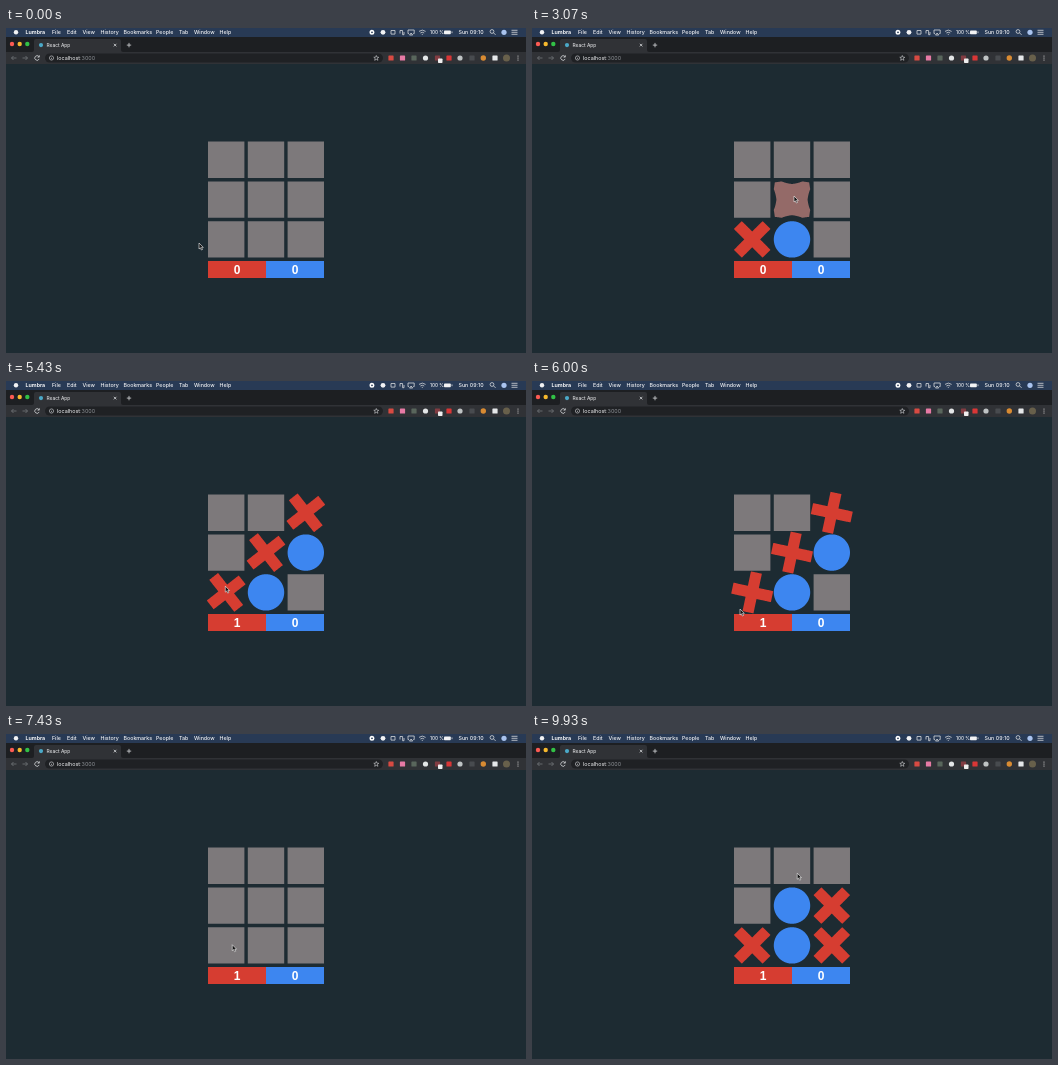
Animation, 520 px wide and 325 px high, one loop 10 s. Source, as an HTML page:

```html
<!DOCTYPE html>
<html lang="en">
<head>
<meta charset="utf-8">
<title>Tic-tac-toe</title>
<style>
  html, body { margin: 0; width: 100%; height: 100%; overflow: hidden; background: #1d2b32; }
  svg { display: block; width: 520px; height: 325px; }
  text { font-family: Inter, Roboto, sans-serif; fill: #f1f2f4; }
  .menu { font-size: 5.3px; font-weight: 500; }
  .score { font: bold 12px "Liberation Sans", Arial, sans-serif; text-anchor: middle; fill: #fff; }
  .line { fill: none; stroke: #d5d7da; stroke-width: .8; }
</style>
</head>
<body>
<svg viewBox="0 0 520 325">
  <rect width="520" height="9" fill="#283a55"/>
  <rect y="9" width="520" height="15" fill="#1d1f22"/>
  <path d="M26 24q2 0 2-2v-9q0-2 2-2h83q2 0 2 2v9q0 2 2 2h403v12H0V24z" fill="#303236"/>
  <rect x="39" y="25.5" width="338" height="9" rx="4.5" fill="#1f2124"/>

  <g id="dots"></g>
  <g id="menu" class="menu"></g>

  <!-- menu bar status -->
  <circle cx="366" cy="4.3" r="1.7" fill="none" stroke="#fff" stroke-width="1.6"/>
  <path class="line" d="M385 2.5h4v3.6h-4zM394 5.5v-3h2.6v4.2h1.4V4M403 5.6h-1V2h6.200v3.600h-1M403.500 7l1.600-2 1.600 2z"/>
  <path class="line" d="M413 3.400q3.300-2.600 6.600 0M414.400 5q1.900-1.500 3.800 0M415.800 6.400h1"/>
  <rect x="438" y="2.400" width="6.800" height="3.800" rx=".8" fill="#f1f2f4"/>
  <path class="line" d="M446 3.400v1.800"/>
  <path class="line" d="M487.600 4.900l2 2M505.500 2.300h6M505.500 4.300h6M505.500 6.300h6"/>
  <circle class="line" cx="486" cy="3.500" r="1.900"/>

  <!-- tab and toolbar -->
  <text x="40.500" y="18.900" font-size="4.900">React App</text>
  <path class="line" d="M107.800 15.800l2.600 2.600m0-2.600l-2.600 2.600M120.800 17.100h4.400m-2.200-2.200v4.400"/>
  <path class="line" stroke="#777" style="stroke:#73767a" d="M10.500 30h-5m2-2l-2 2 2 2M16.500 30h5m-2-2l2 2-2 2"/>
  <path class="line" d="M33 28.700a2.300 2.300 0 1 0 .2 2.200M33.300 27.300v1.800h-1.800"/>
  <circle class="line" cx="45.500" cy="30" r="2.100" style="stroke-width:.6"/>
  <path class="line" d="M45.500 29.700v1.300" style="stroke-width:.6"/>
  <text x="51" y="31.900" font-size="5.400">localhost<tspan fill="#8d9196">:3000</tspan></text>
  <path class="line" style="stroke-width:.6" d="M370.300 27.500l.7 1.700 1.800.1-1.400 1.200.5 1.800-1.600-1-1.600 1 .5-1.800-1.400-1.200 1.800-.1z"/>
  <rect x="432" y="30.500" width="4.500" height="4.500" rx=".7" fill="#eee"/>

  <g id="cells"></g>
  <rect x="202" y="233" width="58" height="17" fill="#d63d31"/>
  <rect x="260" y="233" width="58" height="17" fill="#3d86f0"/>
  <text id="red" class="score" x="231" y="245.700">0</text>
  <text class="score" x="289" y="245.700">0</text>
  <path id="cursor" d="M0 0v6l1.400-1.200 1 2.200 1.100-.5-1-2.100h1.800z" fill="#111" stroke="#f4f4f4" stroke-width=".6"/>
</svg>
<script>
const $ = id => document.getElementById(id);
const add = (parent, tag, attrs, text = '') => {
  const el = document.createElementNS('http://www.w3.org/2000/svg', tag);
  for (const k in attrs) el.setAttribute(k, attrs[k]);
  el.textContent = text;
  return parent.appendChild(el);
};

// Browser furniture: plain dots and squares, then menu labels
for (const [cx, cy, r, fill] of [
  [10, 4.3, 2.2, '#f1f2f4'], [377, 4.3, 2.4, '#f1f2f4'], [498, 4.3, 2.6, '#a9c3ee'],
  [6, 16, 2.2, '#fc5b53'], [13.7, 16, 2.2, '#f6b92d'], [21.3, 16, 2.2, '#32c146'],
  [35, 17.1, 2.1, '#4ba9c8'], [419.5, 30, 2.6, '#e4e6e7'], [454, 30, 2.6, '#bfc3c4'],
  [477.3, 30, 2.7, '#d98b32'], [500.5, 30, 3.5, '#68604b'],
  [512, 28, .6, '#ddd'], [512, 30, .6, '#ddd'], [512, 32, .6, '#ddd']
]) add($('dots'), 'circle', { cx, cy, r, fill });
for (const [x, fill] of [[385, '#d84a42'], [396.500, '#e77aa5'], [408, '#59665c'],
  [431.500, '#823c42'], [443, '#d93636'], [466, '#484b4f'], [489, '#e5e7e9']])
  add($('dots'), 'rect', { x: x - 2.6, y: 27.4, width: 5.2, height: 5.2, rx: .7, fill });
for (const [x, label] of [[19.5, 'Lumbra'], [46, 'File'], [61, 'Edit'], [76.5, 'View'],
  [94.5, 'History'], [117.5, 'Bookmarks'], [150, 'People'], [173, 'Tab'], [188, 'Window'],
  [213.5, 'Help'], [424, '100 %'], [452.5, 'Sun 09:10']])
  add($('menu'), 'text', { x, y: 6.2, 'font-weight': x < 20 ? 700 : 500,
    'font-size': x === 424 ? 4.7 : 5.3 }, label);

// Each shape is a radius per direction plus a colour
const shapes = {
  square: { rgb: [125, 121, 123], r: (c, s) => 18.2 / Math.max(c, s) },
  circle: { rgb: [61, 134, 240], r: () => 18.2 },
  cross: { rgb: [214, 61, 49], r: (c, s) => {
    const u = (c + s) / Math.SQRT2, v = Math.abs(c - s) / Math.SQRT2;
    return Math.min(20.3 / u, 5.6 / v);
  } }
};
const mix = (a, b, p) => a + (b - a) * p;

function outline(from, to, p) {
  let d = '';
  for (let i = 0; i < 360; i++) {
    const a = i * Math.PI / 180, x = Math.cos(a), y = Math.sin(a);
    const c = Math.abs(x), s = Math.abs(y), r = mix(from.r(c, s), to.r(c, s), p);
    d += (i ? 'L' : 'M') + (x * r).toFixed(2) + ' ' + (y * r).toFixed(2);
  }
  return d + 'z';
}

// [cell, shape, start, duration]
const moves = [
  [6, 'cross', 357, 350], [7, 'circle', 2140, 350], [4, 'cross', 3000, 280],
  [5, 'circle', 3640, 280], [2, 'cross', 4429, 84],
  ...[2, 4, 5, 6, 7].map(cell => [cell, 'square', 6360, 200]),
  [6, 'cross', 7500, 220], [7, 'circle', 8000, 350], [8, 'cross', 8750, 250],
  [4, 'circle', 9200, 250], [5, 'cross', 9570, 210]
];

// Keys: [time, values...], linear between
const spin = [[4500, 0], [5430, 97], [6000, 147], [6360, 180]];
const pointer = [
  [0, 193, 215], [210, 213, 208], [800, 213, 208], [1070, 249, 192], [1300, 253, 227],
  [1600, 203, 223], [1860, 217, 208], [2070, 246, 210], [2570, 246, 214], [2930, 262, 168],
  [3360, 262, 168], [3640, 299, 172], [3930, 299, 172], [4210, 299, 139], [4500, 299, 139],
  [4750, 325, 160], [5070, 290, 238], [5430, 219, 205], [6000, 208, 228], [6360, 240, 256],
  [6570, 270, 243], [7000, 305, 124], [7430, 226, 211], [7700, 226, 211], [7930, 262, 212],
  [8500, 262, 212], [8750, 300, 212], [8970, 300, 212], [9200, 262, 172], [9400, 262, 172],
  [9570, 299, 172], [9710, 299, 172], [9930, 265, 139]
];
function track(keys, t) {
  const i = keys.findIndex(k => k[0] > t);
  if (i < 0) return keys.at(-1).slice(1);
  if (!i) return keys[0].slice(1);
  const a = keys[i - 1], b = keys[i], p = (t - a[0]) / (b[0] - a[0]);
  return a.slice(1).map((v, j) => mix(v, b[j + 1], p));
}

const cells = Array.from({ length: 9 }, () => add($('cells'), 'path', {}));

function draw(t) {
  cells.forEach((el, n) => {
    let from = shapes.square, to = from, p = 1;
    for (const [cell, kind, start, span] of moves)
      if (cell === n && t >= start) {
        from = to;
        to = shapes[kind];
        p = Math.min(1, (t - start) / span);
      }
    const winner = n === 2 || n === 4 || n === 6;
    const angle = winner ? track(spin, t)[0] : 0;
    el.setAttribute('d', outline(from, to, p));
    el.setAttribute('fill', `rgb(${from.rgb.map((v, i) => Math.round(mix(v, to.rgb[i], p)))})`);
    el.setAttribute('transform',
      `translate(${220.2 + n % 3 * 39.8} ${131.8 + Math.floor(n / 3) * 39.8}) rotate(${angle})`);
  });
  $('red').textContent = t >= 4490 ? 1 : 0;
  $('cursor').setAttribute('transform', `translate(${track(pointer, t)})`);
}

// The picture advances 14 times a second
let last = -1;
const begin = performance.now();
function tick() {
  const step = Math.floor((performance.now() - begin + 6) * .014) % 140;
  if (step !== last) draw((last = step) / .014);
  requestAnimationFrame(tick);
}
tick();
</script>
</body>
</html>
```
